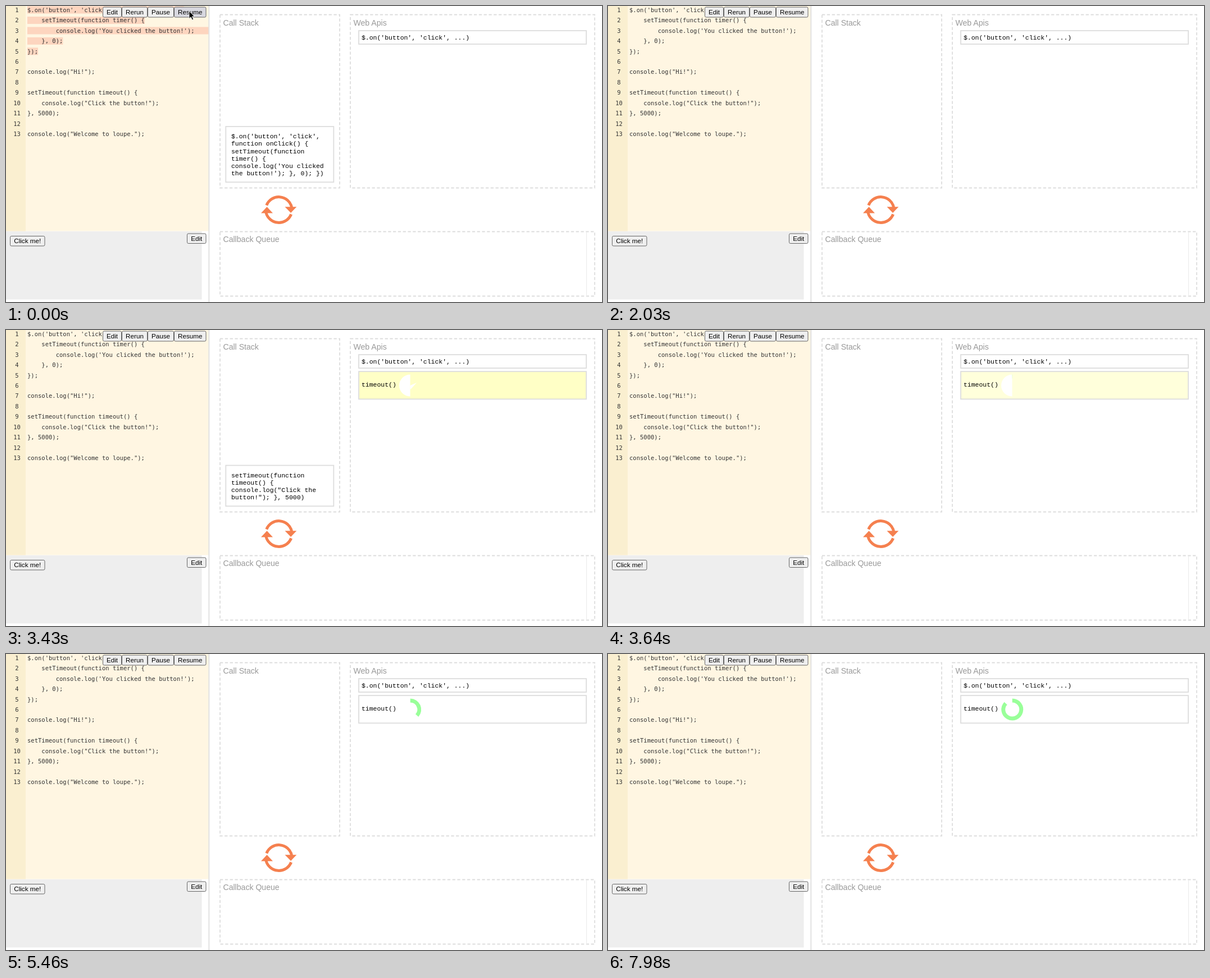
Write an HTML page that moves like this. It is 1061 px wide and 528 px high and loops after 8000 ms.

```html
<!DOCTYPE html>
<html lang="en">
<head>
<meta charset="utf-8">
<title>Event loop</title>
<style>
  html, body { margin: 0; width: 100%; height: 100%; overflow: hidden; background: #fff; }
  svg { display: block; width: 1061px; height: 528px; }
  text { white-space: pre; }
  .code { font: 10.52px "DejaVu Sans Mono", monospace; fill: #333; }
  .call { font: 11.44px "Liberation Mono", monospace; fill: #000; }
  .title { font: 14.08px "Liberation Sans", sans-serif; fill: #999; }
  .label { font: 11.7px "Liberation Sans", sans-serif; fill: #000; text-anchor: middle; }
  .num { text-anchor: middle; }
  .dashed { fill: none; stroke: #ddd; stroke-width: 1.8; stroke-dasharray: 5.3 3.5; }
  .box { fill: #fff; stroke: #ddd; stroke-width: 1.8; }
  .button { fill: #efefef; stroke: #666; stroke-width: 1; }
  .mark { fill: #fdd5bf; }
</style>
</head>
<body>
<svg id="stage" viewBox="0 0 1061 528"></svg>
<script>
const LOOP = 8000, STEP = 70, FADE = 175;
const LINE = 18.46, CHAR = 6.333;
const stage = document.getElementById('stage');

function add(parent, tag, attrs, content) {
  const el = document.createElementNS('http://www.w3.org/2000/svg', tag);
  for (const key in attrs) el.setAttribute(key, attrs[key]);
  if (content !== undefined) el.textContent = content;
  parent.append(el);
  return el;
}
const rect = (x, y, x2, y2, attrs, parent = stage) =>
  add(parent, 'rect', { x, y, width: x2 - x, height: y2 - y, ...attrs });
const text = (x, y, cls, content, parent = stage) =>
  add(parent, 'text', { x, y, class: cls }, content);
const show = (el, on) => el.setAttribute('visibility', on ? 'visible' : 'hidden');
const clamp = v => Math.max(0, Math.min(1, v));

const source = [
  "$.on('button', 'click', function onClick() {",
  "    setTimeout(function timer() {",
  "        console.log('You clicked the button!');    ",
  "    }, 0);",
  "});",
  "",
  'console.log("Hi!");',
  "",
  "setTimeout(function timeout() {",
  '    console.log("Click the button!");',
  "}, 5000);",
  "",
  'console.log("Welcome to loupe.");'
];

// Each call: first and last source line, time in, time out, wrapped text
const calls = [
  { from: 0, to: 4, start: -1000, end: 350, rows: [
    "$.on('button', 'click',", "function onClick() {", "setTimeout(function", "timer() {",
    "console.log('You clicked", "the button!'); }, 0); })"] },
  { from: 6, to: 6, start: 1120, end: 1890, rows: ['console.log("Hi!")'] },
  { from: 8, to: 10, start: 2660, end: 3430, rows: [
    "setTimeout(function", "timeout() {", 'console.log("Click the', 'button!"); }, 5000)'] },
  { from: 12, to: 12, start: 4200, end: 4970, rows: ['console.log("Welcome to', 'loupe.")'] }
];

// Editor
rect(0, 0, 360.5, 401.5, { fill: '#fff6e2' });
rect(0, 0, 35, 401.5, { fill: '#faefd0' });
for (const call of calls) {
  call.marks = add(stage, 'g', {});
  for (let i = call.from; i <= call.to; i++) {
    const y = 0.5 + i * LINE;
    const right = Math.min(360.5, 38 + source[i].length * CHAR);
    rect(38, y, right, y + 13, { class: 'mark' }, call.marks);
  }
}
source.forEach((line, i) => {
  const y = 10.7 + i * LINE;
  text(19.5, y, 'code num', i + 1);
  text(38, y, 'code', line);
});
rect(0, 402, 348.5, 523.5, { fill: '#eee' });
rect(360.5, 0, 362.2, 528, { fill: '#ddd' });

function button(x, y, x2, y2, label) {
  const el = rect(x + .5, y + .5, x2 - .5, y2 - .5, { class: 'button', rx: 2.2 });
  text((x + x2) / 2, (y + y2) / 2 + 4.2, 'label', label);
  return el;
}
button(172, 1.5, 206, 20.5, 'Edit');
button(206, 1.5, 252, 20.5, 'Rerun');
button(252, 1.5, 299, 20.5, 'Pause');
const resume = button(299, 1.5, 356.5, 20.5, 'Resume');
button(322, 405.5, 356.5, 424, 'Edit');
button(7, 410, 69.5, 428.5, 'Click me!');

// Panels
rect(381, 15.5, 594, 324.5, { class: 'dashed' });
rect(613, 15.5, 1048, 324.5, { class: 'dashed' });
rect(381, 402.5, 1048, 517.5, { class: 'dashed' });
rect(1033, 404, 1034, 516, { fill: '#e9e9e9' });
text(386.5, 34.5, 'title', 'Call Stack');
text(618.5, 34.5, 'title', 'Web Apis');
text(386.5, 420.7, 'title', 'Callback Queue');

// Call stack frames
for (const call of calls) {
  const top = 294.5 - call.rows.length * 13.25;
  call.frame = add(stage, 'g', {});
  rect(391.3, top, 583.3, 314.2, { class: 'box' }, call.frame);
  call.rows.forEach((row, i) => text(401, top + 21 + i * 13.25, 'call', row, call.frame));
}

// Web APIs
rect(628, 44, 1033, 68, { class: 'box' });
text(633, 59.5, 'call', "$.on('button', 'click', ...)");
const timer = add(stage, 'g', {});
const timerBox = rect(628, 74, 1033, 123.3, { class: 'box' }, timer);
text(633, 101.2, 'call', 'timeout()', timer);
add(timer, 'path', { d: 'M719.5 79.5A19.5 19.5 0 0 0 719.5 118.5Z', fill: '#fff' });
const wedge = add(timer, 'path', { d: 'M719.5 99L731 94L722 104L719.5 106Z', fill: '#fff' });
const ring = add(timer, 'path', { fill: 'none', stroke: '#99ff99', 'stroke-width': 7 });

// Loop icon
const icon = add(stage, 'g', { fill: '#f5804f', stroke: 'none' });
add(icon, 'path', {
  d: 'M463.8 355.5A23.5 23.5 0 0 1 508.6 359M462.8 368A23.5 23.5 0 0 0 507.6 371.5',
  fill: 'none', stroke: '#f5804f', 'stroke-width': 5
});
add(icon, 'path', { d: 'M496.5 358.3H517.3L507 369Z M454 369.6H475L464.5 358.3Z' });

const pointer = add(stage, 'path', {
  d: 'M0 0V13.5L3.1 10.7L5.4 15.8L7.7 14.8L5.5 9.8H9.6Z',
  fill: '#000', stroke: '#fff', 'stroke-width': .9
});
const pointerPath = [[330, 60], [342, 200], [354, 370], [362, 509]];

function arc(deg) {
  const a = deg * Math.PI / 180, r = 16, cx = 719.7, cy = 99;
  return `M${cx} ${cy - r}A${r} ${r} 0 ${deg > 180 ? 1 : 0} 1 ` +
    `${cx + r * Math.sin(a)} ${cy - r * Math.cos(a)}`;
}

function draw(t) {
  for (const call of calls) {
    show(call.marks, t >= call.start && t < call.end);
    const fadeIn = t < call.start ? 0 : clamp((t - call.start + 35) / FADE);
    const fadeOut = clamp(1 - (t - call.end) / 140);
    call.frame.setAttribute('opacity', Math.min(fadeIn, fadeOut));
  }

  show(timer, t >= 3430);
  const flash = clamp((t - 3430) / 560);
  timerBox.style.fill = `rgb(255, 255, ${Math.round(198 + 57 * flash)})`;
  show(wedge, t >= 3430 && t < 3500);
  const turn = (t - 3630) / 5000 * 360;
  ring.setAttribute('d', turn > 0 ? arc(turn) : '');

  const i = Math.floor((t - 280) / STEP);
  const spot = t < 280 ? [326, 9] : pointerPath[i];
  show(pointer, !!spot);
  if (spot) pointer.setAttribute('transform', `translate(${spot})`);
  resume.style.fill = t < 280 ? '#d8d8e0' : '';
}

const begin = performance.now();
function tick() {
  const t = (performance.now() - begin) % LOOP;
  draw(Math.floor(t / STEP) * STEP);
  requestAnimationFrame(tick);
}
tick();
</script>
</body>
</html>
```
